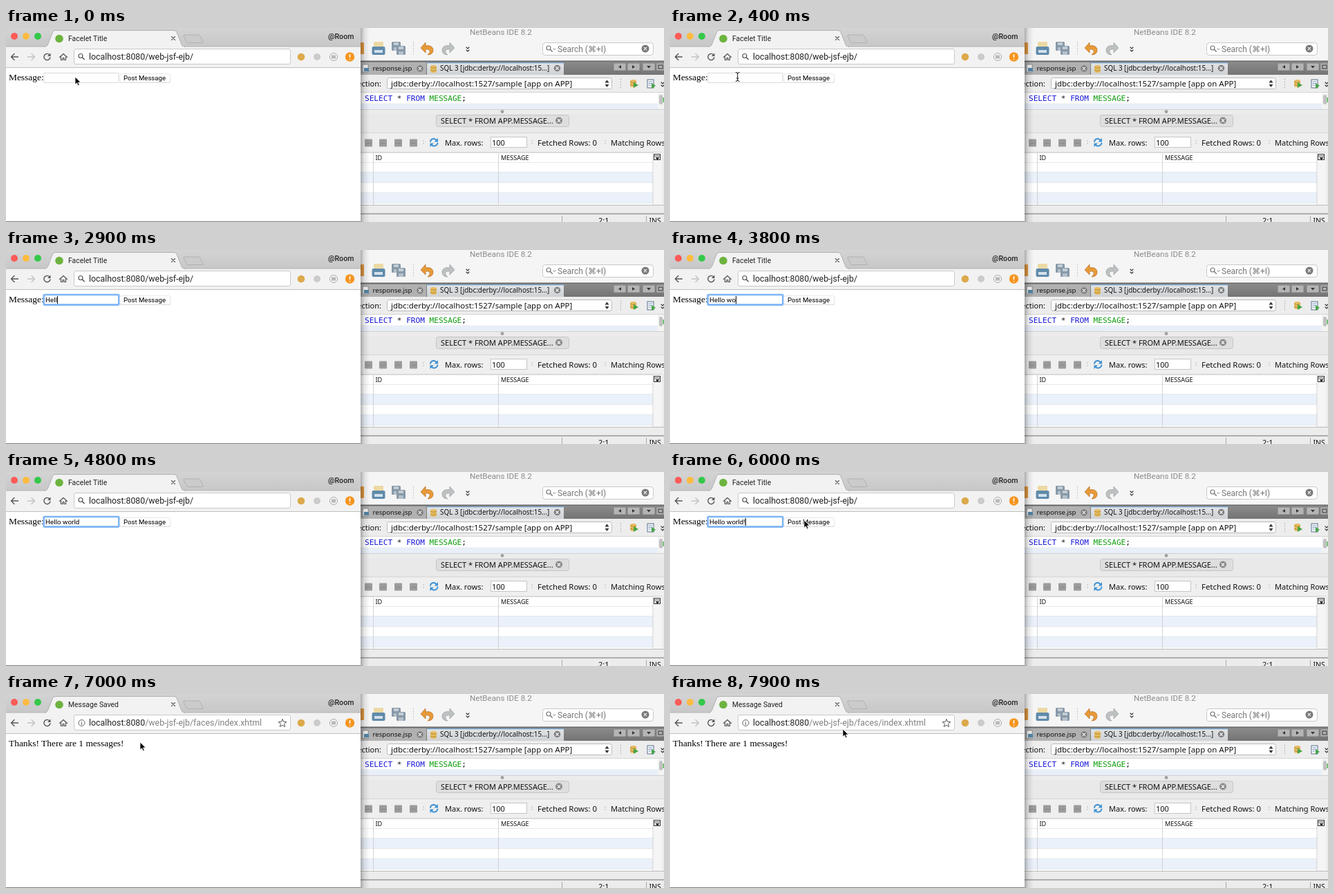
An HTML page for the animation above (8000 ms loop, 952 px wide and 282 px high).

```html
<!DOCTYPE html>
<html lang="en">
<head>
<meta charset="utf-8">
<title>Posting a message</title>
<style>
html, body { margin: 0; width: 100%; height: 100%; overflow: hidden; background: #fff; }
svg { display: block; width: 952px; height: 282px; }
text { white-space: pre; }
.ui { font-family: Roboto, sans-serif; }
.ide { font-family: "Noto Sans", sans-serif; }
.page { font: 13.42px "Liberation Serif", serif; }
.code { font: 11.1px "DejaVu Sans Mono", monospace; }
.line { fill: none; stroke-linecap: round; stroke-linejoin: round; }
</style>
</head>
<body>
<svg id="stage" viewBox="0 0 952 282">
  <defs>
    <linearGradient id="shade"><stop stop-color="#000" stop-opacity=".3"/><stop offset=".4" stop-color="#000" stop-opacity=".1"/><stop offset="1" stop-color="#000" stop-opacity="0"/></linearGradient>
    <linearGradient id="strip" x2="0" y2="1"><stop stop-color="#d3d3d3"/><stop offset="1" stop-color="#c7c7c7"/></linearGradient>
    <linearGradient id="tabs" x2="0" y2="1"><stop stop-color="#8c8c8c"/><stop offset="1" stop-color="#747474"/></linearGradient>
    <linearGradient id="active" x2="0" y2="1"><stop stop-color="#e2e4e6"/><stop offset="1" stop-color="#cfd2d5"/></linearGradient>
  </defs>
  <g id="ide"></g>
  <g id="browser"></g>

  <g id="form">
    <text class="page" x="4" y="76">Message:</text>
    <rect x="55" y="65.5" width="108" height="14" fill="#fff" stroke="#d0d0d0" stroke-width=".8"/>
    <rect id="focus" x="54.7" y="65" width="108.6" height="14.6" rx="1.5" fill="#fff" stroke="#7db5f5" stroke-width="2.7"/>
    <text id="typed" class="ui" x="57" y="75.8" font-size="9.85"></text>
    <rect id="caret" y="67" width="1" height="11"/>
    <rect x="165" y="67" width="73" height="13" rx="3" fill="#ccc"/>
    <rect id="button" x="164.8" y="66.4" width="73" height="12.8" rx="3" fill="#fff" stroke="#dedede" stroke-width=".7"/>
    <text class="ui" x="170" y="75.8" font-size="9.6">Post Message</text>
  </g>
  <text id="thanks" class="page" x="4" y="76">Thanks! There are 1 messages!</text>

  <g id="arrow"><path d="M0 0V11.2L2.6 8.8 4.3 12.8 6.2 12 4.5 8.1H8Z" stroke="#fff" stroke-width=".8"/></g>
  <g id="beam"><path class="line" d="M-2.5-6.5Q0-6.5 0-4.5Q0-6.5 2.5-6.5M0-5V5M-2.5 6.5Q0 6.5 0 4.5Q0 6.5 2.5 6.5M-1.3 2H1.3" stroke="#111"/></g>
</svg>
<script>
const $ = id => document.getElementById(id);
const rect = (x, y, w, h, fill, more = '') =>
  `<rect x="${x}" y="${y}" width="${w}" height="${h}" fill="${fill}" ${more}/>`;
const circle = (x, y, r, fill, more = '') =>
  `<circle cx="${x}" cy="${y}" r="${r}" fill="${fill}" ${more}/>`;
const line = (d, stroke, width = 1, more = '') =>
  `<path class="line" d="${d}" stroke="${stroke}" stroke-width="${width}" ${more}/>`;
const shape = (d, fill, more = '') => `<path d="${d}" fill="${fill}" ${more}/>`;
const label = (x, y, size, text, fill = '#111', font = 'ide', more = '') =>
  `<text class="${font}" x="${x}" y="${y}" font-size="${size}" fill="${fill}" ${more}>${text}</text>`;
const closeDot = (x, y, r, fill) => circle(x, y, r, fill) +
  line(`M${x - 1.8} ${y - 1.8}l3.6 3.6m0-3.6l-3.6 3.6`, '#fff', 1.2);
const chevrons = (x, y) => line(`M${x - 2} ${y - 3}l2 2 2-2m-4 4l2 2 2-2`, '#333', 1.1);
const lens = (x, y, stroke) => circle(x, y, 3, 'none', `stroke="${stroke}" stroke-width="1.2"`) +
  line(`M${x + 2.3} ${y + 2.3}l3 3`, stroke, 1.4);
const disk = (x, y, fill) => rect(x, y, 13, 13, fill, 'rx="1.5"') +
  rect(x + 3, y + 1, 7, 4, '#c3cdd5') + rect(x + 3, y + 8, 7, 5, '#b4c0ca');
const database = (x, y) => rect(x, y, 9, 11, '#e6bd62', 'rx="3"') +
  line(`M${x + .5} ${y + 3.5}q4 2 8 0m-8 4q4 2 8 0`, '#a87a28', .8);

function ideWindow() {
  const title = rect(500, 0, 452, 48, '#f5f5f5') +
    label(671, 9.5, 11.65, 'NetBeans IDE 8.2', '#8b8b8b', 'ui') +
    rect(507, 21, 11, 17, '#e59b3f', 'rx="1"') +
    rect(532, 20, 14, 10, '#ecd9a4', 'rx="1"') + rect(529.5, 27, 19, 12, '#5f8bad', 'rx="2"') + rect(533, 32, 12, 4, '#d5e1ea') +
    disk(558, 20, '#8799a8') + disk(565, 26, '#8799a8') +
    line('M589.5 21V39', '#bbb', 1, 'stroke-dasharray="1 3"') +
    shape('M600 29L607 21V26C616 24 620 30 617 36Q615 39 610 39C616 34 613 30 607 31V36Z', '#e79a38', 'stroke="#b66b1d" stroke-width=".7"') +
    shape('M649 29L642 21V26C633 24 629 30 632 36Q634 39 639 39C633 34 636 30 642 31V36Z', '#bdc1c2', 'stroke="#989c9e" stroke-width=".7"') +
    chevrons(668, 31) +
    rect(776.5, 21.5, 160, 18, '#fff', 'rx="4" stroke="#c8c8c8"') + lens(785, 29, '#777') +
    line('M792 30l1.5 1.5 1.5-1.5', '#777') +
    label(798, 35, 12, 'Search (⌘+I)', '#777', 'ui') + closeDot(925, 30, 5.5, '#777');

  const tabs = rect(500, 48, 452, 20, 'url(#tabs)') + rect(500, 47.5, 452, 1.2, '#5c5c5c') +
    rect(500, 50, 108, 18, '#b1b1b1') + rect(516, 53, 8, 11, '#f4f4f4', 'stroke="#777" stroke-width=".7"') +
    rect(518, 58, 7, 5, '#5686a8') + label(530.5, 62.4, 9.6, 'response.jsp') + closeDot(599, 59, 4.7, '#7d7d7d') +
    rect(609, 50, 198, 18, 'url(#active)') + rect(609, 50, 198, 1.2, '#6f9fd0') +
    database(614, 54) + label(628, 62.4, 9.9, 'SQL 3 [jdbc:derby://localhost:15...]') + closeDot(797.5, 58.5, 4.7, '#7d7d7d') +
    [[879, 18], [899, 18], [921, 18], [941, 11]].map(([x, w]) => rect(x, 51, w, 11, '#b4b4b4', 'stroke="#777" stroke-width=".7"')).join('') +
    shape('M886 56.5l4-2.5v5zM910 56.5l-4-2.5v5zM927 55h6l-3 3.5z', '#333') +
    rect(944, 54, 6, 5, 'none', 'stroke="#333"');

  const connection = rect(500, 68, 452, 26, '#ededed') + rect(500, 93.5, 452, 1, '#bbb') +
    label(543, 85, 11, 'Connection:', '#111', 'ide', 'text-anchor="end"') +
    rect(551.5, 72.5, 325, 16, '#fff', 'rx="3" stroke="#b9b9b9"') +
    label(557, 84.7, 11.5, 'jdbc:derby://localhost:1527/sample [app on APP]') +
    shape('M866.5 79.5l3-4 3 4zM866.5 82l3 4 3-4z', '#333') +
    line('M889.5 74V88', '#aaa', 1, 'stroke-dasharray="1 3"') +
    database(903, 75) + shape('M908 79l7 4-7 4z', '#46a546') +
    rect(928, 75, 9, 12, '#fafafa', 'stroke="#56718d"') + line('M930 78h5m-5 2.5h5m-5 2.5h3', '#5d86b5', .8) +
    shape('M934 80l6 4-6 4z', '#46a546') + chevrons(950, 82);

  const editor = rect(500, 94, 452, 24, '#fff') + rect(500, 109.5, 443, 8.5, '#e9eff8') +
    rect(943, 94, 9, 24, '#f3f3f3') + rect(945, 97, 5, 14, '#c1c1c1', 'rx="2.5"') + rect(950.5, 101, 1.5, 7, '#58b558') +
    `<text class="code" x="519" y="106" fill="#1515d8">SELECT <tspan fill="#111">*</tspan> FROM <tspan fill="#0a9b0a">MESSAGE</tspan><tspan fill="#111">;</tspan></text>` +
    rect(500, 118, 452, 164, '#ececec') + rect(500, 118, 452, .8, '#c8c8c8') +
    circle(718, 121.5, 2, '#aaa', 'stroke="#777" stroke-width=".6"');

  const results = rect(500, 125, 452, 28, '#e9e9e9') + rect(500, 152.5, 452, 1, '#c3c3c3') +
    rect(622.5, 126.5, 192, 17, '#dedede', 'rx="3" stroke="#c6c6c6"') +
    label(629, 139, 11, 'SELECT * FROM APP.MESSAGE...') + closeDot(800, 134.5, 5, '#8a8a8a') +
    rect(500, 153, 452, 28, '#efefef') +
    [519, 540, 562, 584].map(x => rect(x, 161.5, 11, 11, '#9b9b9b', 'rx="1"') + rect(x + 2, 167, 7, 1, '#888')).join('') +
    [604, 761, 867].map(x => line(`M${x} 164v4`, '#999', 1, 'stroke-dasharray=".5 3"')).join('') +
    line('M614 165Q615 160.5 620 161.2L623 163M624.5 167.5Q623 172 618 171.5L615 169.5', '#3c91d4', 2) +
    shape('M625 160v5.5h-5.5zM613.5 173v-5.5h5.5z', '#3c91d4') +
    label(635, 170.5, 11, 'Max. rows:') + rect(701.5, 158.5, 52, 15, '#fff', 'stroke="#c6c6c6"') + label(703, 170.5, 11, '100') +
    label(769, 170.5, 11.4, 'Fetched Rows: 0') + label(875, 170.5, 11, 'Matching Rows: ');

  const table = rect(500, 181, 449, 76, '#fff') + rect(500, 180.5, 449, 1, '#bdbdbd') +
    [209.5, 239.5].map(y => rect(500, y, 436, 15, '#eaf1fa')).join('') +
    [195, 209.5, 224.5, 239.5, 254.5].map(y => rect(500, y, 436, .6, '#d6dbe1')).join('') +
    [531, 712].map(x => rect(x, 182, .8, 75, '#c9c9c9')).join('') +
    label(534.5, 191.8, 9.1, 'ID') + label(716, 191.8, 9.1, 'MESSAGE') +
    rect(936, 181, 13, 76, '#f5f5f5') + rect(935.5, 181, .8, 76, '#ccc') +
    rect(937.5, 183.5, 9, 8, '#fff', 'stroke="#333"') + line('M938 186h8', '#333') + shape('M939.5 188h6l-3 4z', '#222') +
    rect(500, 257, 452, 1, '#bbb') + rect(500, 269.5, 452, 1.2, '#858585') +
    rect(500, 271, 452, 11, '#ececec') +
    [804, 926].map(x => rect(x, 273, 1, 9, '#aaa')).join('') +
    label(857, 283.5, 11, '2:1') + label(930.5, 283.5, 10.5, 'INS');

  return title + tabs + connection + editor + results + table;
}

function browserWindow() {
  return rect(513, 0, 13, 282, 'url(#shade)') + rect(0, 0, 513, 282, '#fff') + rect(0, 0, 513, 28, 'url(#strip)') +
    rect(0, 27, 513, 30, '#f2f2f2') + rect(0, 26.6, 513, .8, '#aaa') + rect(0, 57, 513, .9, '#b9b9b9') +
    shape('M56 27.5Q59 27 60.5 24L67.5 6Q68.5 3.5 71 3.5H243Q246 3.5 247 6L254 24Q255 27 259 27.5Z', '#f2f2f2', 'stroke="#a5a5a5" stroke-width=".8"') +
    rect(57, 27, 201, 2, '#f2f2f2') +
    shape('M258 10H278Q280 10 281 12L285 20Q285.5 21.5 284 21.5H264Q262 21.5 261 19.5L257 12Q256.5 10 258 10Z', '#cbcbcb', 'stroke="#aaa" stroke-width=".8"') +
    circle(12, 12, 5, '#fc5b57') + circle(29, 12, 5, '#fdbc40') + circle(46, 12, 5, '#34c84a') +
    line('M239.5 12.5l5 5m0-5l-5 5', '#555', 1.1) +
    label(466, 16, 10.6, '@Room', '#222', 'ui', 'font-weight="500"') +
    line('M17.5 42H7.5M12 37.5L7.5 42 12 46.5', '#555', 1.4) +
    line('M31.5 42H41.5M37 37.5L41.5 42 37 46.5', '#c2c2c2', 1.4) +
    `<g id="reload">${line('M63 39A4.6 4.6 0 1 0 64 43', '#555', 1.4)}${shape('M64.5 36.5v4.5H60z', '#555')}</g>` +
    `<g id="stop">${line('M55.5 38l8 8m0-8l-8 8', '#555', 1.4)}</g>` +
    line('M77.5 42.5L83 37.5 88.5 42.5M79.5 42V46.5H82V43.5H84V46.5H86.5V42', '#555', 1.2) +
    rect(98.5, 30.5, 313, 22, '#fff', 'rx="2.5" stroke="#c5c5c5" stroke-width=".9"') +
    `<g id="search">${lens(108, 40.5, '#555')}</g>` +
    `<g id="doc">${line('M106 37h4.5l2.5 2.5V47H106ZM110.5 37v2.5h2.5', '#777')}</g>` +
    `<g id="info">${circle(109.5, 42, 4.5, 'none', 'stroke="#666"')}${line('M109.5 41.5v3m0-5v.1', '#666', 1.1)}</g>` +
    '<text class="ui" x="120" y="46" font-size="12.35" fill="#222">localhost:8080<tspan id="path"></tspan></text>' +
    `<g id="star">${shape('M400 36.5l1.6 3.8 4.2.4-3.2 2.7 1 4.1-3.6-2.2-3.6 2.2 1-4.1-3.2-2.7 4.2-.4z', 'none', 'stroke="#555"')}</g>` +
    circle(427, 42, 5.3, '#dca94b') + circle(450, 42, 5, '#cbcbcb') +
    circle(474, 42, 5.5, '#f5f5f5', 'stroke="#aaa"') + rect(471, 39.5, 6, 5, '#b9b9b9') +
    circle(497.5, 42, 6.7, '#f6951e') + line('M497.5 38.5v4m0 3v.1', '#fff', 1.6) +
    `<g id="leaf">${circle(77, 15.5, 5.8, '#6db33f')}</g>` +
    `<g id="spinner">${line('M77 10.5A5 5 0 0 1 82 15.5', '#7287c4', 1.5)}</g>` +
    '<text id="title" class="ui" x="90" y="18.8" font-size="10.4" fill="#222"></text>' +
    rect(0, 281, 513, 1, '#777');
}

$('ide').innerHTML = ideWindow();
$('browser').innerHTML = browserWindow();

const LOOP = 8000;
const MESSAGE = 'Hello world!';
const KEYS = [2200, 2600, 2800, 2900, 3200, 3400, 3700, 3800, 4000, 4100, 4300, 4900];
const FOCUS = 800, BLUR = 6100, LOAD = 6200, LOADED = 6400;
// time, x, y of the pointer
const POINTER = [[0, 100, 71], [100, 100, 71], [500, 97, 71], [5300, 97, 71], [5500, 120, 78],
  [5700, 168, 75], [5900, 194, 70], [7600, 194, 70], [7700, 205, 66], [7800, 233, 57], [7900, 250, 51]];

function pointerAt(t) {
  const i = POINTER.findIndex(p => p[0] > t);
  if (i < 0) return POINTER.at(-1).slice(1);
  const [t0, x0, y0] = POINTER[i - 1], [t1, x1, y1] = POINTER[i];
  const k = (t - t0) / (t1 - t0);
  return [x0 + (x1 - x0) * k, y0 + (y1 - y0) * k];
}
const show = (id, on) => { $(id).style.display = on ? '' : 'none'; };
const write = (id, text) => { if ($(id).textContent !== text) $(id).textContent = text; };

function render(time) {
  const t = Math.floor(time % LOOP / 100) * 100;
  const keys = KEYS.filter(k => k <= t);
  const loading = t >= LOAD && t < LOADED, saved = t >= LOADED;
  const focused = t >= FOCUS && t < BLUR;

  show('form', !saved);
  show('thanks', saved);
  show('focus', focused);
  write('typed', MESSAGE.slice(0, keys.length));
  const since = t - (keys.length ? keys.at(-1) : 500);
  show('caret', focused && since % 1000 < 500);
  $('caret').setAttribute('x', 57 + (keys.length && !saved ? $('typed').getComputedTextLength() : 0));
  $('button').setAttribute('fill', t === BLUR ? '#e4e4e4' : '#fff');

  show('search', t < LOAD);
  show('doc', loading);
  show('stop', loading);
  show('spinner', loading);
  show('reload', !loading);
  show('leaf', !loading);
  show('info', saved);
  show('star', saved);
  write('title', saved ? 'Message Saved' : 'Facelet Title');
  write('path', saved ? '/web-jsf-ejb/faces/index.xhtml' : '/web-jsf-ejb/');
  $('path').setAttribute('fill', t < LOAD ? '#222' : '#808080');
  $('spinner').setAttribute('transform', `rotate(${(t - LOAD - 100) * .6} 77 15.5)`);

  const [x, y] = pointerAt(t);
  const beam = t >= 200 && t < 5500;
  show('beam', beam && (t < KEYS[0] || t >= 5300));
  show('arrow', !beam);
  for (const id of ['beam', 'arrow']) $(id).setAttribute('transform', `translate(${x} ${y})`);
}

const start = performance.now();
function tick() {
  render(performance.now() - start);
  requestAnimationFrame(tick);
}
tick();
</script>
</body>
</html>
```
